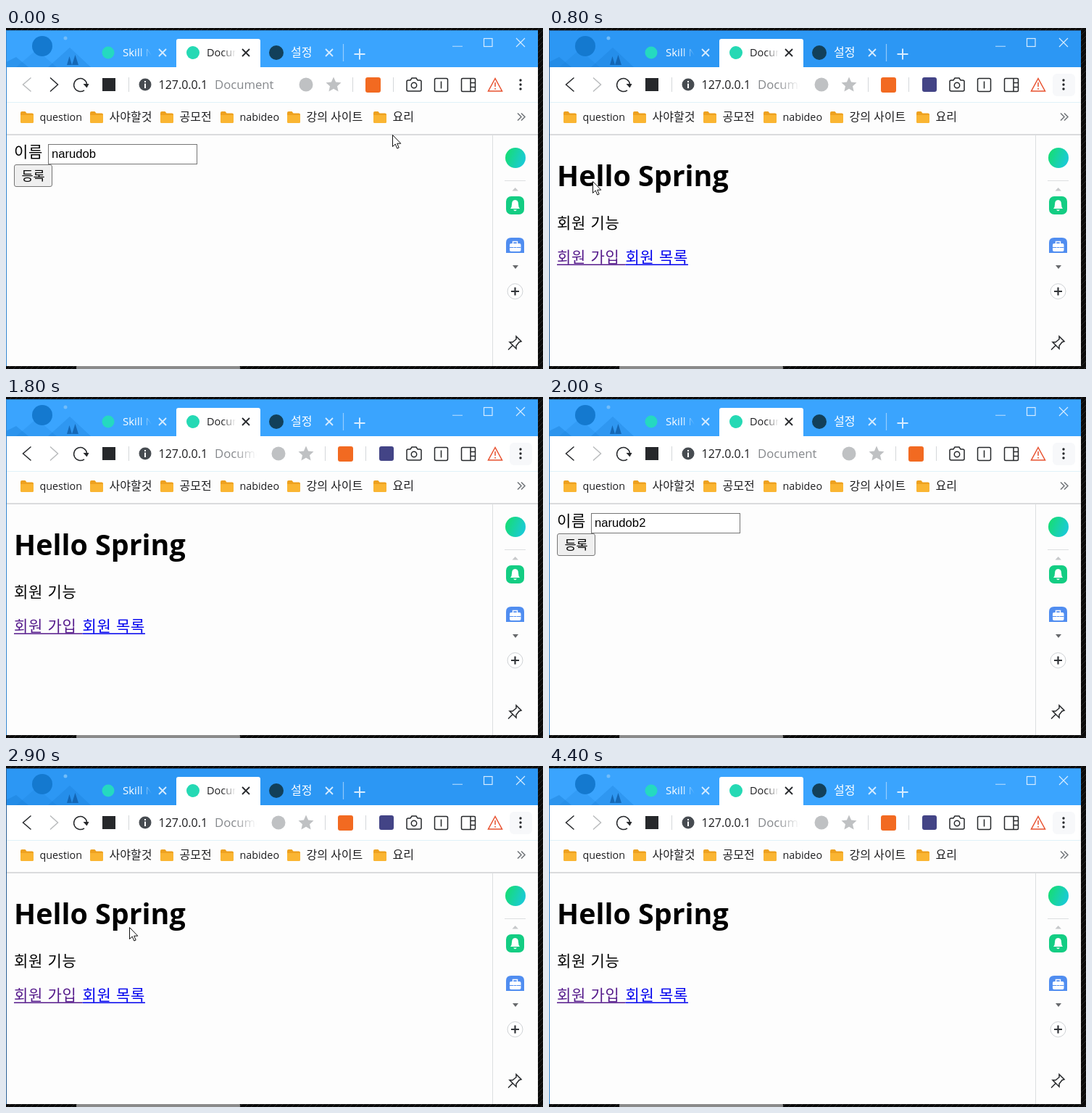
Write an HTML page that moves like this. It is 741 by 470 pixels and loops after 4.5 s.

```html
<!DOCTYPE html>
<html lang="ko">
<head>
<meta charset="utf-8">
<title>Form demo</title>
<style>
html, body { margin: 0; width: 100%; height: 100%; overflow: hidden; background: #0b0b0b; }
svg { display: block; width: 100vw; height: 100vh; }
text { font-family: "Open Sans", "Noto Sans CJK KR", "Noto Sans CJK", sans-serif; fill: #1d1d1f; white-space: pre; }
.ko { font-size: 16px; font-weight: 300; }
.page { font-size: 21px; font-weight: 300; letter-spacing: .8px; fill: #000; }
.line { fill: none; stroke: #26282b; stroke-width: 1.5; }
.sep { stroke: #d4d7da; }
.white { fill: none; stroke: #d6ecff; stroke-width: 1.2; }
</style>
</head>
<body>
<svg viewBox="0 0 741 470">
  <defs>
    <pattern id="hatch" width="8" height="8" patternUnits="userSpaceOnUse">
      <path d="M-2 10L10-2M-2 2L2-2M6 10L10 6" stroke="#262626"/>
    </pattern>
    <linearGradient id="fadeTab"><stop offset=".6" stop-color="#fff"/><stop offset="1" stop-color="#000"/></linearGradient>
    <mask id="tabMask1"><rect x="155" y="15" width="46" height="35" fill="url(#fadeTab)"/></mask>
    <mask id="tabMask2"><rect x="270" y="15" width="47" height="35" fill="url(#fadeTab)"/></mask>
    <mask id="urlMask"><rect x="270" y="60" width="76" height="35" fill="url(#fadeTab)"/></mask>
    <g id="folder">
      <path d="M0 2q0-2 2-2h4.500l2 2.500H16q2 0 2 2V14q0 2-2 2H2q-2 0-2-2z" fill="#eea11f"/>
      <path d="M0 5h18v9q0 2-2 2H2q-2 0-2-2z" fill="#fab532"/>
    </g>
    <path id="cross" d="M-5-5L5 5M5-5L-5 5"/>
    <g id="pageTools">
      <circle cx="414" cy="78" r="9.500" fill="#bfc1c3"/>
      <path d="M452 67.500l3.100 6.900 7.400.8-5.500 5 1.600 7.300-6.600-3.700-6.600 3.700 1.600-7.300-5.500-5 7.400-.8z" fill="#bfc1c3"/>
      <path class="sep" d="M478.500 68v20M534.500 68v20"/>
      <rect x="496" y="68" width="21" height="21" rx="3" fill="#f26a21"/>
    </g>
  </defs>

  <rect width="741" height="470" fill="#0b0b0b"/>
  <rect width="741" height="470" fill="url(#hatch)"/>
  <rect x="97" y="462" width="226" height="12" rx="6" fill="#8a8a8a"/>
  <rect y="3" width="734" height="463" fill="#fdfdfd"/>

  <rect id="header" y="3" width="734" height="51"/>
  <g fill="#1479cf">
    <path d="M0 47L14 40 31 54H0z" opacity=".35"/>
    <path d="M14 54L42 30 70 54z" opacity=".2"/>
    <path d="M58 54L88 27 117 54z" opacity=".3"/>
    <path d="M84 51l3.500-12 3.500 12zM91 51l4.500-14 4.500 14z" fill="#0f5ca8" opacity=".8"/>
    <circle cx="82" cy="14" r="2.500" fill="#72bdfa"/>
    <circle cx="50" cy="25" r="14"/>
  </g>
  <path d="M235 54V18q0-3 3-3H348q3 0 3 3V54z" fill="#fff"/>
  <circle cx="141" cy="34" r="8.500" fill="#25d9c0"/>
  <circle cx="258" cy="34" r="9" fill="#25d9b4"/>
  <circle cx="373" cy="34" r="10" fill="#12405a"/>
  <text x="161" y="39" font-size="15" style="fill:#fff" mask="url(#tabMask1)">Skill Note</text>
  <text x="277" y="39" font-size="14.500" mask="url(#tabMask2)">Document</text>
  <text x="393" y="39" class="ko" style="fill:#fff">설정</text>
  <g class="white">
    <g style="stroke-width:1.800"><use href="#cross" x="216" y="34"/><use href="#cross" x="446" y="34"/></g>
    <path d="M480.500 36h15M488 28.500v15" style="stroke-width:2"/>
    <path d="M465.500 22v24" opacity=".6"/>
    <rect x="659.500" y="14.500" width="11.500" height="11"/>
    <path d="M704 14l12 12M716 14l-12 12"/>
    <path id="minimise" d="M616 25.300h14"/>
  </g>
  <use href="#cross" x="331" y="34" class="line" style="stroke-width:1.800"/>

  <rect x="1" y="54" width="733" height="48" fill="#fff"/>
  <path id="back" class="line" d="M34.500 68.500L23.500 78l11 9.500"/>
  <path id="forward" class="line" d="M61 68.500L71.500 78 61 87.500"/>
  <path class="line" d="M108 85.800A9 9 0 1 1 111.500 77"/>
  <path d="M106.500 77h8l-3 5.500z" fill="#26282b"/>
  <rect x="133" y="69" width="18" height="18" fill="#26282b"/>
  <path class="sep" d="M169.500 68v20"/>
  <circle cx="192" cy="78" r="8.500" fill="#474c51"/>
  <path d="M192 73v2M192 76.500v6.500" stroke="#fff" stroke-width="2"/>
  <text x="210.500" y="84" font-size="16">127.0.0.1</text>
  <g id="formTools">
    <text x="288" y="84" font-size="16.700" style="fill:#85888c">Document</text>
    <use href="#pageTools"/>
  </g>
  <g id="helloTools">
    <text x="288" y="84" font-size="16.700" style="fill:#85888c" mask="url(#urlMask)">Document</text>
    <use href="#pageTools" x="-38"/>
    <rect x="515" y="68" width="20" height="20" rx="3" fill="#434486"/>
  </g>
  <g class="line">
    <path d="M555 72h3l2-3h6l2 3h3q2 0 2 2V85q0 2-2 2H555q-2 0-2-2V74q0-2 2-2z"/>
    <circle cx="563" cy="79" r="3.700"/>
    <rect x="591.500" y="69.500" width="18" height="18" rx="2"/><path d="M600.500 73.500v10"/>
    <rect x="628.500" y="69.500" width="19" height="18" rx="1.500"/><path d="M641 69.500v18M641 75.500h6.500M641 81.500h6.500"/>
    <path d="M675 69.500l9.500 17.500h-19zM675 75v6M675 82.800v2" stroke="#e8512f"/>
  </g>
  <rect id="menuHover" x="695" y="63" width="31" height="31" rx="6" fill="#f7f8fa"/>
  <g fill="#26282b"><circle cx="710" cy="72" r="1.700"/><circle cx="710" cy="78" r="1.700"/><circle cx="710" cy="84" r="1.700"/></g>

  <path d="M1 102.500H734" stroke="#dff1f8"/>
  <g id="bookmarks"></g>
  <path class="line" d="M706 117.500l5 5-5 5M711 117.500l5 5-5 5" style="stroke:#707478"/>
  <path d="M1 147H734" stroke="#cfd1d3" stroke-width="1.500"/>

  <path d="M671.500 148V466" stroke="#dddfe1"/>
  <linearGradient id="ball" x2="1" y2=".4"><stop stop-color="#16df68"/><stop offset="1" stop-color="#1acbd2"/></linearGradient>
  <circle cx="703" cy="179" r="14" fill="url(#ball)"/>
  <path d="M688 210.500h29" stroke="#dddfe1"/>
  <path d="M698.500 224.500l4.200-4.500 4.200 4.500z" fill="#c6c8ca"/>
  <rect x="690" y="232" width="25" height="25" rx="7" fill="#13cd83"/>
  <path d="M696 249q2-2 2-6 0-6 4.500-6t4.500 6q0 4 2 6zM700 250.500h5q-2.500 3.500-5 0z" fill="#fff"/>
  <path d="M690 310V296q0-7 7-7h11q7 0 7 7v14z" fill="#508df0"/>
  <rect x="695" y="297" width="15.500" height="11" rx="2" fill="#fff"/>
  <path d="M699.500 297v-2.500h6v2.500" fill="none" stroke="#fff" stroke-width="1.500"/>
  <path d="M695 302.500h5.500M705 302.500h5.500M701 302.500h3.500" stroke="#508df0" stroke-width="1.200"/>
  <path d="M699 327h8l-4 5z" fill="#67696c"/>
  <circle cx="702.500" cy="363" r="10.500" fill="#fff" stroke="#cfd2d5"/>
  <path d="M697 363h11M702.500 357.500v11" stroke="#33363a" stroke-width="2.200"/>
  <path class="line" d="M704 425l7 7-3 1-4 5 0 4-9-9 4 0 5-4zM699 437.500l-6 6"/>

  <g id="form">
    <text class="page" x="11" y="178">이름</text>
    <rect x="58.500" y="160.500" width="205" height="27" fill="#fff" stroke="#767676"/>
    <text id="field" x="63" y="179" style="font:16.670px 'Liberation Sans',sans-serif;fill:#000"></text>
    <rect id="button" x="11.500" y="188.500" width="52" height="30" rx="2.500"/>
    <text x="21.500" y="210" font-size="17.500" font-weight="300" style="fill:#000">등록</text>
  </g>
  <g id="hello">
    <text x="11" y="218" font-size="39.400" font-weight="700" style="fill:#000">Hello Spring</text>
    <text class="page" x="11" y="276">회원 기능</text>
    <text class="page" x="11" y="323" style="fill:#551a8b">회원 가입</text>
    <text class="page" x="105.500" y="323" style="fill:#0000ee">회원 목록</text>
    <path d="M11 326.300H105.500" stroke="#551a8b" stroke-width="1.500"/>
    <path d="M105.500 326.300H192" stroke="#0000ee" stroke-width="1.500"/>
  </g>
  <path id="edge" d="M734 3.500H.5V466" fill="none"/>
  <path id="cursor" d="M.5.500V16.500L4.200 13l2.600 6 2.400-1-2.500-5.800h5.100z" fill="#fff" stroke="#111"/>
</svg>
<script>
const LOOP = 4500;
const $ = id => document.getElementById(id);
const show = (id, on) => $(id).style.display = on ? '' : 'none';
const paint = (id, prop, value) => $(id).style[prop] = value;

const bookmarks = [[20, 'question'], [116, '사야할것'], [213, '공모전'],
  [296, 'nabideo'], [388, '강의 사이트'], [507, '요리']];
$('bookmarks').innerHTML = bookmarks.map(([x, label]) => {
  const style = /[a-z]/.test(label) ? 'font-size="14.3"' : 'class="ko"';
  return `<use href="#folder" x="${x}" y="115"/><text x="${x + 26.5}" y="128" ${style}>${label}</text>`;
}).join('');

// Pointer steps: time, x, y; a bare time hides it.
const pointer = [
  [0, 533, 147], [100, 440, 160], [200, 300, 180], [300, 170, 198], [400, 87, 213], [500, 60, 211],
  [1000, 300, 222], [1100, 558, 226], [1200, 660, 110], [1300, 700, 40], [1400, 712, 13], [1500],
  [2100, 600, 80], [2200, 400, 140], [2300, 168, 190], [2400, 87, 213], [2500, 50, 213],
  [2600, 55, 197], [2900, 170, 222], [3000, 328, 245], [3100, 303, 184], [3300]
];

function render(t) {
  const within = (from, to = LOOP) => t >= from && t < to;
  const hello = within(700, 2000) || within(2900);
  const dim = within(400, 1800) || within(2800, 4400);
  const visited = within(700);
  const hover = within(500, 700) || within(2600, 2900);

  show('hello', hello);
  show('helloTools', hello);
  show('form', !hello);
  show('formTools', !hello);
  show('menuHover', within(400));
  $('field').textContent = visited ? 'narudob2' : 'narudob';
  paint('header', 'fill', dim ? '#2c97f4' : '#3aa4fe');
  paint('edge', 'stroke', dim ? '#2a5f94' : '#3285d0');
  paint('back', 'stroke', visited ? '#26282b' : '#b9bbbd');
  paint('forward', 'stroke', visited ? '#b9bbbd' : '#26282b');
  paint('button', 'fill', hover ? '#e5e5e5' : '#efefef');
  paint('button', 'stroke', hover ? '#4f4f4f' : '#767676');
  paint('minimise', 'stroke', within(3300, 3500) ? '#fff' : '#a9d5fc');

  const [, x, y] = pointer.findLast(step => step[0] <= t);
  show('cursor', x !== undefined);
  if (x !== undefined) $('cursor').setAttribute('transform', `translate(${x} ${y})`);
}

const start = performance.now();
function tick() {
  render((performance.now() - start) % LOOP);
  requestAnimationFrame(tick);
}
tick();
</script>
</body>
</html>
```
